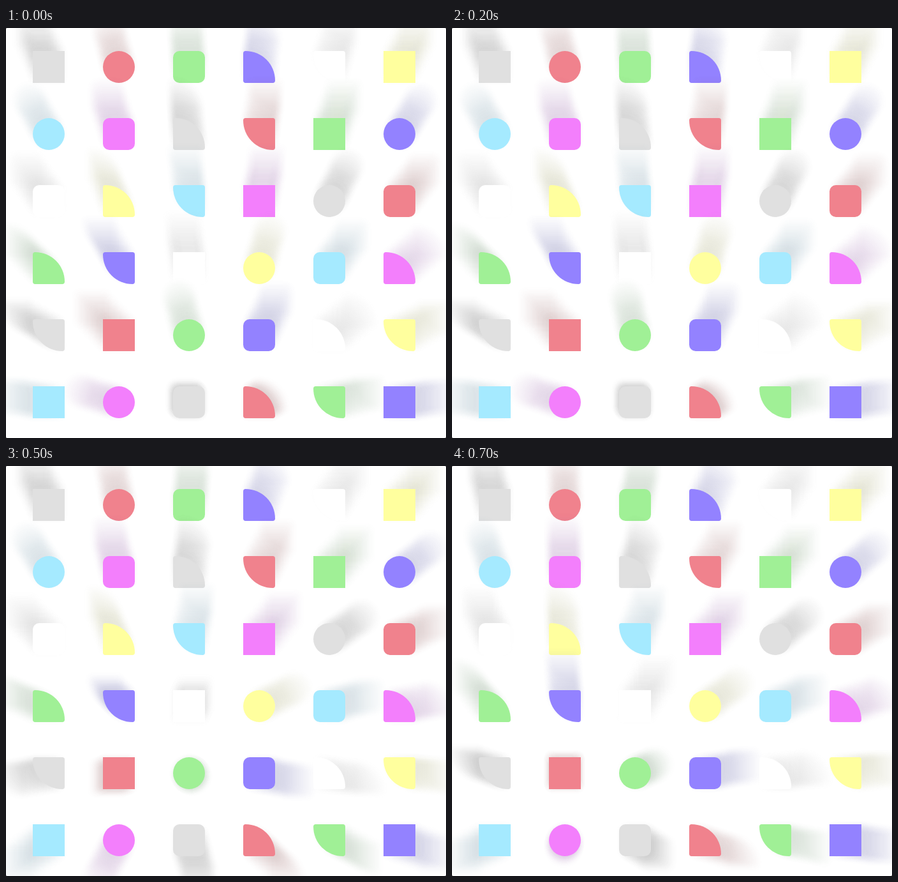
Write an HTML page that moves like this. It is 690x642 px and loops after 0.8 s.

```html
<!DOCTYPE html>
<html lang="en">
<head>
<meta charset="utf-8">
<title>Shapes and light</title>
<style>
  html, body { margin: 0; width: 100%; height: 100%; overflow: hidden; }
  html { background: #666; }
  body { position: relative; background: #fff; border-radius: 2px; }
  div { position: absolute; width: 50px; height: 50px; }
</style>
</head>
<body>
<script>
const COLORS = ['#e0e0e0', '#f0828d', '#a0f096', '#9382ff', '#ffffff', '#ffff9e', '#a5eaff', '#f37ffc'];
const RADII = ['0', '50%', '10px', '4px 50px 4px 4px', '4px 4px 4px 50px'];
const STOPS = [[321, 631], [264, 165], [436, 270], [249, 449], [190, 522]];
const STEP = 100, STEPS = 8, LAYERS = 6, REACH = 60;

// The light rests on the first and last stop, drifting slowly while it waits.
function lightAt(step) {
  const stop = Math.max(0, Math.min(step - 2, STOPS.length - 1));
  const wait = step - 2 - stop;
  const [x, y] = STOPS[stop];
  return [x - 2 * wait, y + wait];
}

function shade(hex, amount) {
  const rgb = [1, 3, 5].map(p => Math.round(parseInt(hex.slice(p, p + 2), 16) * amount));
  return `rgba(${rgb},0.05)`;
}

const shapes = Array.from({ length: 36 }, (_, i) => {
  const el = document.createElement('div');
  const left = 42 + i % 6 * 110, top = 36 + Math.floor(i / 6) * 105;
  const color = COLORS[i % COLORS.length];
  el.style.cssText = `left:${left}px; top:${top}px; background:${color}; border-radius:${RADII[i % RADII.length]}`;
  document.body.append(el);
  const shadow = shade(color, color === COLORS[0] ? 0.35 : 0.6);
  return { el, x: left + 25, y: top + 25, shadow };
});

function castShadow({ el, x, y, shadow }, [lx, ly]) {
  const dx = x - lx, dy = y - ly;
  const dist = Math.hypot(dx, dy) || 1;
  const scale = Math.min(REACH, dist * dist / 340) / dist;
  el.style.boxShadow = Array.from({ length: LAYERS }, (_, i) => {
    const k = scale * ((i + 1) / LAYERS) ** 1.4;
    return `${(dx * k).toFixed(2)}px ${(dy * k).toFixed(2)}px 10px ${shadow}`;
  }).join();
}

let last = -1;
function draw() {
  const step = Math.floor(performance.now() / STEP) % STEPS;
  if (step !== last) {
    last = step;
    shapes.forEach(s => castShadow(s, lightAt(step)));
  }
  requestAnimationFrame(draw);
}
draw();
</script>
</body>
</html>
```
